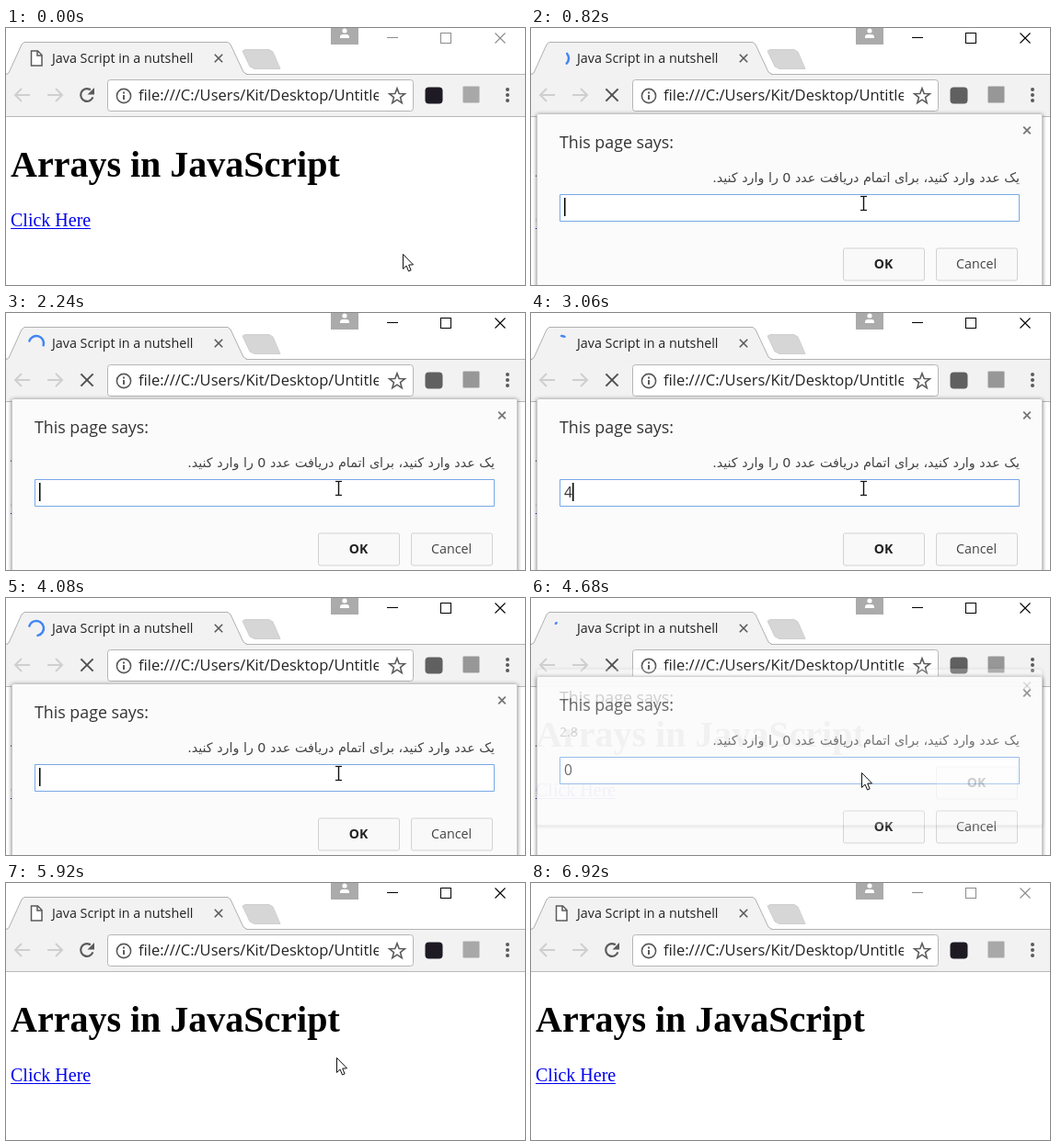
Recreate the animation shown at these times as an HTML page with a canvas. Size 564 by 280 pixels, loop 7140 ms.

```html
<!DOCTYPE html>
<html lang="en">
<head>
<meta charset="utf-8">
<title>Prompt demo</title>
<style>
html, body { margin: 0; width: 100%; height: 100%; overflow: hidden; background: #fff; }
canvas { display: block; }
</style>
</head>
<body>
<canvas id="stage" width="564" height="280"></canvas>
<script>
const g = document.getElementById('stage').getContext('2d');
const LOOP = 7140, STEP = 204, LAST = 34;
const UI = '"Open Sans", "Noto Sans", sans-serif';
const SERIF = '"Liberation Serif", "Times New Roman", serif';
const TYPED = '123440';
const PROMPT = 'یک عدد وارد کنید، برای اتمام دریافت عدد 0 را وارد کنید.';
const TAU = Math.PI * 2;

function text(s, x, y, font, color, align = 'left', dir = 'ltr') {
  g.font = font;
  g.fillStyle = color;
  g.textAlign = align;
  g.direction = dir;
  g.fillText(s, x, y);
}

function path(points, close) {
  g.beginPath();
  points.forEach(([x, y]) => g.lineTo(x, y));
  if (close) g.closePath();
}

function stroke(color, width = 1) {
  g.strokeStyle = color;
  g.lineWidth = width;
  g.stroke();
}

function fill(color) {
  g.fillStyle = color;
  g.fill();
}

function line(points, color, width) {
  path(points);
  stroke(color, width);
}

function cross(x, y, r, color, width) {
  line([[x - r, y - r], [x + r, y + r]], color, width);
  line([[x - r, y + r], [x + r, y - r]], color, width);
}

function disc(x, y, r, color) {
  g.beginPath();
  g.arc(x, y, r, 0, TAU);
  fill(color);
}

function box(x, y, w, h, r, bg, border) {
  g.beginPath();
  g.roundRect(x + .5, y + .5, w, h, r);
  fill(bg);
  if (border) stroke(border);
}

// cubic-bezier(.4, 0, .2, 1)
function ease(p) {
  let lo = 0, hi = 1, u = p;
  for (let n = 0; n < 20; n++) {
    u = (lo + hi) / 2;
    const x = 1.2 * u * (1 - u) ** 2 + .6 * u * u * (1 - u) + u ** 3;
    if (x < p) lo = u; else hi = u;
  }
  return u * u * (3 - 2 * u);
}

function spinner(t) {
  const half = 666, e = t - 1284;
  const turn = Math.floor(e / (2 * half));
  const phase = e - turn * 2 * half;
  let sweep = 270 * ease(phase % half / half);
  if (phase < half) sweep -= 270;
  if (Math.abs(sweep) < 5) sweep = phase < half ? -5 : 5;
  const a = (46 + 360 * t / 1568 + 270 * turn) * Math.PI / 180;
  g.beginPath();
  g.arc(33, 33, 8, a, a + sweep * Math.PI / 180, sweep < 0);
  g.lineCap = 'round';
  stroke('#4285f4', 2.5);
  g.lineCap = 'butt';
}

function pageIcon() {
  path([[27.5, 25], [34.5, 25], [39, 29.5], [39, 41], [27.5, 41]], true);
  fill('#fff');
  stroke('#5a5a5a', 1.5);
  line([[34, 25], [34, 30], [39, 30]], '#5a5a5a', 1.5);
}

function arrow(x, dir) {
  const c = '#cfcfcf';
  line([[x - 8, 73], [x + 8, 73]], c, 2);
  line([[x + dir, 66], [x + 8 * dir, 73], [x + dir, 80]], c, 2);
}

function reload() {
  g.beginPath();
  g.arc(88, 73, 6.8, .35, 5.3);
  stroke('#5a5a5a', 2.2);
  path([[96, 65], [96, 72.5], [88.5, 72.5]], true);
  fill('#5a5a5a');
}

function star(x, y) {
  const pts = [];
  for (let n = 0; n < 10; n++) {
    const r = n % 2 ? 3.7 : 8.8, a = n * Math.PI / 5 - Math.PI / 2;
    pts.push([x + r * Math.cos(a), y + r * Math.sin(a)]);
  }
  path(pts, true);
  stroke('#5a5a5a', 1.6);
}

function titleBar(active) {
  const c = active ? '#000' : '#8c8c8c';
  line([[414, 10.5], [426, 10.5]], c);
  g.strokeStyle = c;
  g.strokeRect(472.5, 5.5, 11, 11);
  cross(537, 11, 5.5, c, 1.1);

  g.fillStyle = '#ababab';
  g.fillRect(353, 0, 30, 18);
  disc(368, 3, 2.6, '#fff');
  g.beginPath();
  g.roundRect(363, 7, 10, 4, [3, 3, 0, 0]);
  fill('#fff');

  path([[260, 23.5], [286, 23.5], [290, 26], [298, 44.5], [270, 44.5], [265, 42], [257, 25]], true);
  fill('#d6d6d6');
  stroke('#cfcfcf');
}

function toolbar(loading, t) {
  g.fillStyle = '#f2f2f2';
  g.fillRect(0, 51, 564, 46);
  line([[0, 50.5], [564, 50.5]], '#b4b4b4');
  line([[0, 96.5], [564, 96.5]], '#b8b8b8');

  path([[0, 51.5], [3, 49], [17, 18], [20, 15.5], [241, 15.5], [244, 18], [258, 48], [262, 51.5]]);
  fill('#f2f2f2');
  path([[0, 50.5], [3, 49], [17, 18], [20, 15.5], [241, 15.5], [244, 18], [258, 48], [262, 50.5]]);
  stroke('#b0b0b0');
  if (loading) spinner(t); else pageIcon();
  text('Java Script in a nutshell', 50, 38, '14.3px ' + UI, '#222');
  cross(231, 33, 4.2, '#5a5a5a', 1.6);

  arrow(18, -1);
  arrow(53, 1);
  if (loading) cross(88, 73, 6.6, '#505050', 2); else reload();

  box(110, 56, 332, 34, 3, '#fff', '#b5b5b5');
  g.beginPath();
  g.arc(128, 74, 7.6, 0, TAU);
  stroke('#5a5a5a', 1.6);
  g.fillStyle = '#5a5a5a';
  g.fillRect(127, 73, 2, 5);
  g.fillRect(127, 69.5, 2, 2);
  g.save();
  g.beginPath();
  g.rect(140, 58, 265, 30);
  g.clip();
  text('file:///C:/Users/Kit/Desktop/Untitled', 144, 79, '16.5px ' + UI, '#222');
  g.restore();
  star(425, 74.5);

  box(455, 64, 19, 18, 4, loading ? '#606060' : '#1d1a24');
  box(496, 63, 18, 18, 1, loading ? '#979797' : '#a8a8a8');
  [67, 73, 79].forEach(y => disc(545, y, 2, '#5a5a5a'));
}

function page() {
  text('Arrays in JavaScript', 5, 162, 'bold 40px ' + SERIF, '#000');
  text('Click Here', 5, 216, '20px ' + SERIF, '#0000ee');
  g.fillRect(5, 218, 87, 1);
}

function button(label, x, y, bold, focus) {
  if (focus) {
    g.beginPath();
    g.roundRect(x - .5, y - .5, 90, 38, 3);
    stroke('#b9d3f5', 2);
  }
  box(x, y, 88, 35, 2, '#f9f9f9', focus ? '#7ea9de' : '#d2d2d2');
  text(label, x + 44, y + 22, (bold ? 'bold 14px ' : '14.25px ') + UI, bold ? '#222' : '#444', 'center');
}

// The shadow is kept outside the panel, so a faded panel stays light.
function shadow(x, y, w, h) {
  g.save();
  g.beginPath();
  g.rect(x - 20, y - 20, w + 40, h + 40);
  g.roundRect(x, y, w, h, 2);
  g.clip('evenodd');
  g.shadowColor = 'rgba(0,0,0,.5)';
  g.shadowBlur = 4;
  g.shadowOffsetY = 1;
  box(x - .5, y - .5, w, h, 2, '#fbfbfb');
  g.restore();
}

function dialog(height, dy, alpha, body) {
  g.save();
  g.globalAlpha = alpha;
  g.translate(0, dy);
  shadow(6, 93, 550, height + 1);
  box(6, 93, 549, height, 2, '#fbfbfb', '#c6c6c6');
  text('This page says:', 31, 131, '17.8px ' + UI, '#333');
  cross(539, 111.5, 3.8, '#777', 1.8);
  body();
  g.restore();
}

function prompt(value, dy = 0, alpha = 1, caret = true) {
  dialog(212, dy, alpha, () => {
    text(PROMPT, 531, 167.5, '14.3px "DejaVu Sans", sans-serif', '#444', 'right', 'rtl');
    box(31, 181, 499, 29, 0, '#fff', '#78a8e6');
    text(value, 36, 201, '15.5px ' + UI, '#333');
    if (caret) {
      g.fillStyle = '#000';
      g.fillRect(value ? 45 : 36, 185, 1.5, 20);
    }
    button('OK', 339, 239.5, true);
    button('Cancel', 440, 239.5);
  });
}

function alertBox(dy = 0, alpha = 1) {
  dialog(170, dy, alpha, () => {
    text('2.8', 31, 167, '14px ' + UI, '#444');
    button('OK', 440, 199.5, true, alpha === 1);
  });
}

function pointer(x, y) {
  path([[0, 0], [0, 16], [3.6, 12.6], [6, 18.5], [8.6, 17.4], [6.2, 11.6], [11, 11.4]]
    .map(([a, b]) => [x + a + .5, y + b + .5]), true);
  fill('#fff');
  stroke('#111');
}

function iBeam(x, y) {
  line([[x, y - 7], [x, y + 7]], '#111', 1.4);
  [-7.5, 7.5].forEach(d => line([[x - 3.5, y + d], [x + 3.5, y + d]], '#111', 1.2));
}

// Prompts cycle every three steps: typed, swapping, empty.
function dialogs(i) {
  const digit = TYPED[Math.floor((i - 6) / 3)] || '';
  if (i === 3) prompt('', -16, .22, false);
  else if (i > 3 && i < 23) {
    const phase = i % 3;
    if (i === 22 || (phase === 0 && i > 5)) prompt(digit);
    else if (phase === 1 && i > 6) {
      prompt(digit, -8, .95, false);
      prompt('', -16, .22, false);
    } else prompt('');
  } else if (i === 23) {
    prompt('0', -8, .95, false);
    alertBox(-16, .22);
  } else if (i > 23 && i < 28) alertBox();
  else if (i === 28) alertBox(-8, .5);
}

function mouse(i) {
  const swapping = i % 3 === 1 && i > 6 && i < 22;
  if (i === 0) pointer(431, 246);
  else if (i > 3 && i < 23 && !swapping) iBeam(361.5, 191);
  else if (i < 31) pointer(359, 190);
  else if (i === 31) pointer(329, 208);
}

function draw(now) {
  const i = Math.min(LAST, Math.floor((now % LOOP + 16) / STEP));
  const loading = i >= 3 && i <= 28;
  g.fillStyle = '#fff';
  g.fillRect(0, 0, 564, 280);
  titleBar(i > 0 && i < LAST);
  toolbar(loading, i * STEP - 12);
  page();
  dialogs(i);
  mouse(i);
}

const start = performance.now();
function tick() {
  draw(performance.now() - start);
  requestAnimationFrame(tick);
}
tick();
</script>
</body>
</html>
```
